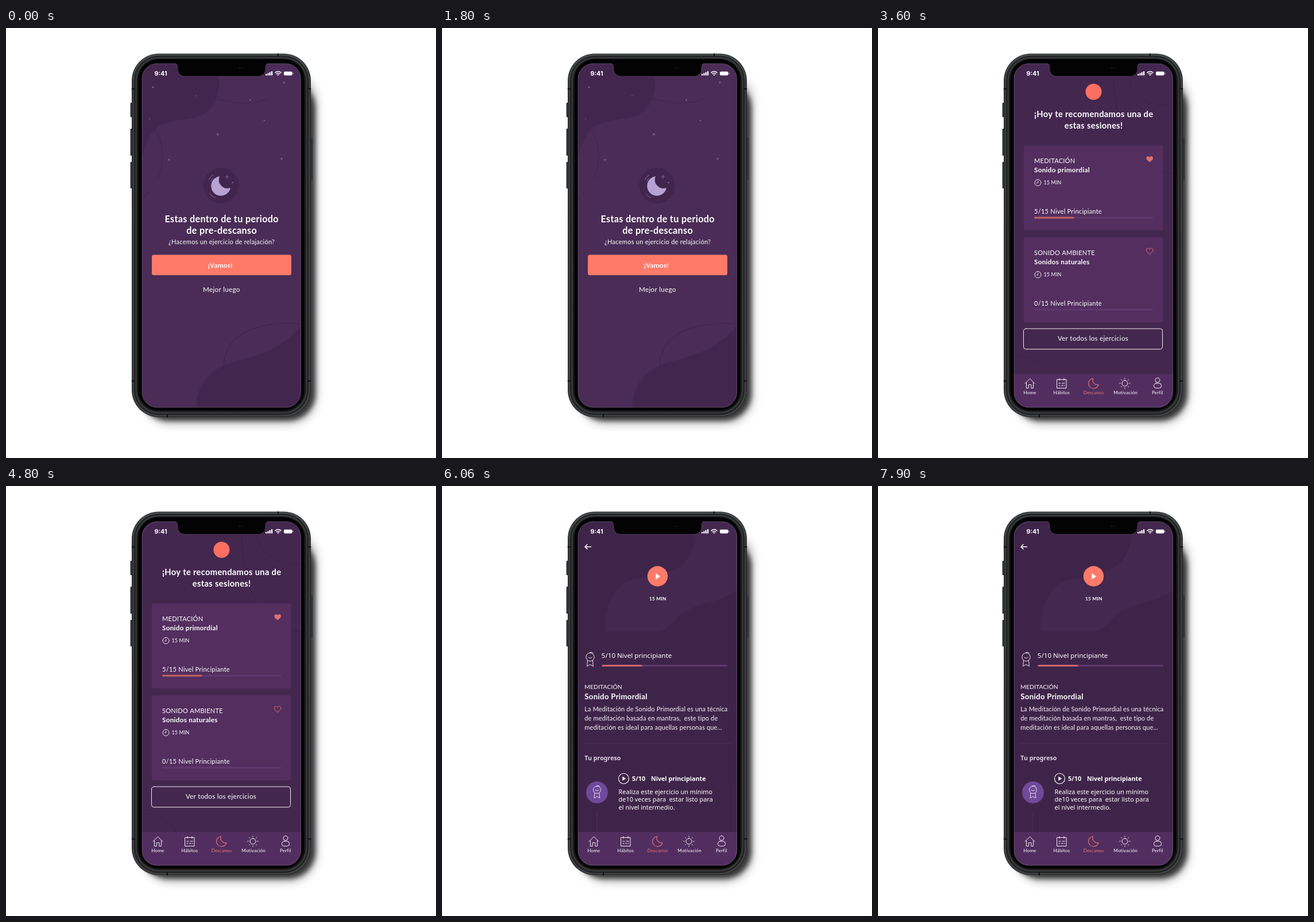
These frames come from a looping animation (749x748 px, 8 s). An HTML page with a canvas:

```html
<!DOCTYPE html>
<html lang="es">
<head>
<meta charset="utf-8">
<title>Descanso</title>
<style>
html, body { margin: 0; width: 100%; height: 100%; overflow: hidden; background: #fff; }
canvas { display: block; width: 749px; height: 748px; }
</style>
</head>
<body>
<canvas id="stage"></canvas>
<script>
const W = 749, H = 748, LOOP = 8000;
const SCREEN = { x: 237, y: 62, w: 276.5, h: 598 };
const CORAL = '#ff7a69';
const dpr = window.devicePixelRatio || 1;
let c;

function layer(draw, canvas = document.createElement('canvas')) {
  canvas.width = W * dpr;
  canvas.height = H * dpr;
  c = canvas.getContext('2d');
  c.scale(dpr, dpr);
  c.lineCap = c.lineJoin = 'round';
  draw();
  return canvas;
}

function fill(d, color) {
  c.fillStyle = color;
  c.fill(new Path2D(d));
}

function line(d, color, width = 1) {
  c.strokeStyle = color;
  c.lineWidth = width;
  c.stroke(new Path2D(d));
}

function box(x, y, w, h, r, color, stroke = 0) {
  c.beginPath();
  c.roundRect(x, y, w, h, r);
  if (stroke) {
    c.strokeStyle = color;
    c.lineWidth = stroke;
    c.stroke();
  } else {
    c.fillStyle = color;
    c.fill();
  }
}

function disc(x, y, r, color, stroke = 0) {
  box(x - r, y - r, 2 * r, 2 * r, r, color, stroke);
}

function text(s, x, y, size, { bold, center, color = '#fff', font = 'Lato', track = 0.02 } = {}) {
  c.font = `${bold ? 'bold ' : ''}${size}px ${font}, sans-serif`;
  c.letterSpacing = size * track + 'px';
  c.textAlign = center ? 'center' : 'left';
  c.fillStyle = color;
  c.fillText(s, x, y);
}

const noto = { font: '"Noto Sans"', track: 0 };
const mid = { center: true };
const midBold = { center: true, bold: true };

// Phone

function shadow(x, y, w, h, blur, alpha) {
  c.save();
  c.filter = `blur(${blur * dpr}px)`;
  box(x, y, w, h, 48, `rgba(0,0,0,${alpha})`);
  c.restore();
}

function phone() {
  shadow(238, 80, 303, 608, 8, 0.3);
  shadow(234, 92, 305, 591, 4.5, 0.7);

  for (const [y, h] of [[130, 25], [175, 47], [233, 46]]) {
    box(216.5, y, 5, h, 1.5, '#25282a');
    line(`M217.6 ${y + 2}v${h - 4}`, '#4a4e50', 0.8);
  }
  box(528, 190, 6, 74, 1.5, '#303235');

  const rim = c.createLinearGradient(0, 44, 0, 678);
  rim.addColorStop(0, '#3a4241');
  rim.addColorStop(0.1, '#292a2b');
  rim.addColorStop(1, '#303133');
  box(219, 44.5, 312, 632.5, 47, rim);
  box(221.8, 47.2, 306.4, 627, 44.5, '#4e5052', 1.2);
  box(224, 49.5, 302, 622.5, 42.5, '#232425', 2.4);
  box(226.8, 51.6, 296.4, 617.5, 40, '#3a3b3d', 1.4);
  box(228.2, 53, 293.6, 614.5, 38, '#141415');
  box(231, 54.5, 288, 610.5, 35, '#020202');

  for (const x of [219.5, 526.5]) {
    line(`M${x} 106h4M${x} 614h4`, '#0d0e0f', 2);
  }
  line('M474 45v4M281 672.5v4', '#0e0f10', 2);
}

function notch() {
  box(SCREEN.x, SCREEN.y, SCREEN.w, SCREEN.h, 26, 'rgba(165,152,176,.45)', 0.8);
  fill('M293 61Q299 62 299 68V71C299 79 304 84 312 84H439C447 84 452 79 452 71V68Q452 62 458 61Z', '#030303');
  line('M294 62.2Q299 63 299 68V71C299 79 304 84 312 84H439C447 84 452 79 452 71V68Q452 63 457 62.2', 'rgba(160,145,172,.4)', 0.7);
  disc(406.5, 70, 0.9, '#26262a');
  disc(410.5, 70, 0.9, '#26262a');
}

function statusBar() {
  text('9:41', 258.5, 83, 10.8, { bold: true, font: 'Inter', track: 0 });
  for (let i = 0; i < 4; i++) box(452 + i * 3.3, 80 - i * 1.6, 2.3, 2.6 + i * 1.6, 0.6, '#fff');
  line('M469 77.6Q474 73.3 479 77.6', '#fff', 1.5);
  line('M471 79.8Q474 77.4 477 79.8', '#fff', 1.4);
  fill('M472.2 81.2Q474 79.9 475.8 81.2L474 83Z', '#fff');
  box(484, 75.8, 14.5, 6.6, 1.8, '#fff');
  box(499.4, 77.8, 1.1, 2.6, 0.5, 'rgba(255,255,255,.6)');
}

function screen(bg, draw) {
  return layer(() => {
    c.beginPath();
    c.roundRect(SCREEN.x, SCREEN.y, SCREEN.w, SCREEN.h, 26);
    c.clip();
    c.fillStyle = bg;
    c.fillRect(0, 0, W, H);
    draw();
    statusBar();
  });
}

// Icons

function heart(x, y, solid) {
  const d = `M${x} ${y + 5.3}C${x - 3} ${y + 3} ${x - 6} ${y + 1} ${x - 5.8} ${y - 2}` +
    `C${x - 5.5} ${y - 5.5} ${x - 1} ${y - 6} ${x} ${y - 2.8}` +
    `C${x + 1} ${y - 6} ${x + 5.5} ${y - 5.5} ${x + 5.8} ${y - 2}` +
    `C${x + 6} ${y + 1} ${x + 3} ${y + 3} ${x} ${y + 5.3}Z`;
  solid ? fill(d, '#dc716f') : line(d, '#dc716f', 1);
}

function clock(x, y) {
  disc(x, y, 5.5, '#fff', 0.9);
  line(`M${x + 0.3} ${y - 3}V${y + 0.5}H${x - 2.2}`, '#fff', 0.8);
}

function badge(x, y, k) {
  c.save();
  c.translate(x, y);
  c.scale(k, k);
  disc(0, 0, 7.2, '#fff', 0.9);
  line('M-3.2 0.5Q0 3.5 3.2 0.5M-1-7Q3-10 5-6.5M-4.5 6.2L-5.3 16L0 13L5.3 16L4.5 6.2', '#fff', 0.9);
  c.restore();
}

function tabBar() {
  box(237, 602, 277, 60, 0, '#522e60');
  const ink = '#f4eef7';
  line('M256 618.5L264.5 610L273 618.5M258.5 617V626.5H262.2V620.5H266.8V626.5H270.5V617', ink);
  line('M312 611.5H328V626.5H312ZM316 609.5V613M324 609.5V613', ink);
  line('M315 618H318M321 618H325M315 622H317M319.5 622H322M324 622H325', ink, 1.2);
  line('M374.5 609.5A8.8 8.8 0 1 0 384 620.5A8.2 8.2 0 0 1 374.5 609.5Z', '#ef7770', 1.1);
  disc(430, 618, 5, ink, 1);
  for (let i = 0; i < 8; i++) {
    const a = i * Math.PI / 4, u = Math.cos(a), v = Math.sin(a);
    line(`M${430 + 7.7 * u} ${618 + 7.7 * v}L${430 + 9.2 * u} ${618 + 9.2 * v}`, ink);
  }
  disc(487, 612.5, 4, ink, 1);
  box(480.5, 618, 13, 8.5, 4, ink, 1);
  ['Home', 'Hábitos', 'Descanso', 'Motivación', 'Perfil'].forEach((label, i) =>
    text(label, 264.3 + i * 55.6, 637, 8.12, { center: true, color: i === 2 ? '#ef7770' : '#fff' }));
}

function progress(x, y, w, done, track, color = '#c4625f') {
  box(x, y, w, 3, 1.5, track);
  if (done) box(x, y, done, 3, 1.5, color);
}

// Screens

function invite() {
  fill('M237 62H371V84C374 116 361 146 332 155C303 162 273 160 256 180C244 195 240 213 237 228Z', '#43264e');
  fill('M331 661C332 627 349 598 386 584C430 571 478 563 514 517V661Z', '#43264e');
  const faint = '#40244b';
  line('M362 122C395 131 430 135 454 124', faint);
  line('M256 174C277 195 278 238 263 265M250 284Q244 292 237 297', faint);
  line('M379 589C380 545 415 510 510 514.5', faint, 1.2);

  for (const [x, y, r] of [[256, 103, 1.7], [331, 118, 0.9], [425.5, 125, 1.6], [450, 161, 1.3],
    [250, 158, 1], [369, 185, 2], [284, 229, 1.7], [480, 227.5, 1.7], [484, 95, 1.7]]) {
    disc(x, y, r, '#77598a');
  }

  disc(374.5, 274, 31, '#41254d');
  fill('M372 258A17 17 0 1 0 391 278A15 15 0 0 1 372 258Z', '#b8a2d2');
  line('M353.5 264Q356 258.5 361 255.5M356.5 267Q358 264 360 262M355 288Q358.5 293 364 295', '#6f5385', 1.3);
  line('M385 256V262M382 259H388', '#80649a', 1.1);
  disc(394.5, 269, 1.2, '#80649a');

  text('Estas dentro de tu periodo', 375.7, 337.5, 16.2, midBold);
  text('de pre-descanso', 375.7, 358.3, 16.2, midBold);
  text('¿Hacemos un ejercicio de relajación?', 375.7, 376, 11.1, mid);
  box(254, 394.5, 243, 35.5, 3.5, CORAL);
  text('¡Vamos!', 373.3, 417, 11.8, midBold);
  text('Mejor luego', 375.3, 458.5, 11.8, mid);
}

function card(y, kind, name, done, liked) {
  box(254, y, 242.5, 148, 3, '#532e5f');
  text(kind, 272, y + 30.5, 11.1);
  text(name, 272, y + 46.7, 11.8, { bold: true });
  clock(278.5, y + 65);
  text('15 MIN', 288.5, y + 68.2, 8.85);
  text(`${done}/15 Nivel Principiante`, 272, y + 118.5, 11.1);
  progress(272, y + 124.5, 207, done * 13.9, '#633871');
  heart(473.2, y + 24, liked);
}

function sessions() {
  const faint = '#3c2147';
  line('M411 85C412 165 440 253 514 253', faint);
  line('M437 85C441 120 475 136 514 135', faint);
  line('M239 571C268 569 287 582 295 602', faint);
  disc(375.5, 111, 14, '#ff6f61');
  text('¡Hoy te recomendamos una de', 375.7, 154.5, 14.76, midBold);
  text('estas sesiones!', 375.7, 175, 14.76, midBold);
  card(204, 'MEDITACIÓN', 'Sonido primordial', 5, true);
  card(364, 'SONIDO AMBIENTE', 'Sonidos naturales', 0, false);
  box(253.5, 523, 242, 35.7, 4, '#f3edf5', 1);
  text('Ver todos los ejercicios', 374.5, 543.5, 11.7, mid);
  tabBar();
}

function detail() {
  fill('M283 253C283 214 296 171 336 162C386 154 438 150 441 84V62H514V181C480 205 442 202 415 224C400 240 390 252 373 253Z', '#44284f');
  line('M253 101.8L249 105.7L253 109.6M249.3 105.7H259.5', '#fff', 1.5);
  disc(375.5, 157, 17.7, CORAL);
  fill('M373 153L379.3 157.3L373 161.6Z', '#fff');
  line('M373 153L379.3 157.3L373 161.6Z', '#fff', 1.2);
  text('15 MIN', 375.8, 198.5, 8.4, midBold);

  badge(258, 297.5, 1);
  text('5/10 Nivel principiante', 277.8, 299, 11.6, noto);
  progress(278.5, 311, 218.5, 70, '#5d3970', '#cf686c');

  text('MEDITACIÓN', 248.3, 352.7, 10.33, { track: 0.01 });
  text('Sonido Primordial', 248.3, 371, 13.28, { bold: true });
  ['La Meditación de Sonido Primordial es una técnica',
    'de meditación basada en mantras,  este tipo de',
    'meditación es ideal para aquellas personas que...'
  ].forEach((s, i) => text(s, 248.3, 391.5 + i * 16.4, 11.07, { color: '#f8f4fa', track: 0.01 }));
  line('M248 447.5H503', '#4d305a', 0.8);

  text('Tu progreso', 248.3, 476.5, 10.7, { ...noto, bold: true, color: '#ddd3e4' });
  disc(316.5, 509, 9, '#fff', 1.1);
  fill('M314.3 505.3L320.3 509L314.3 512.7Z', '#fff');
  text('5/10', 331, 512.5, 10.9, { ...noto, bold: true });
  text('Nivel principiante', 364, 512.5, 10.7, { ...noto, bold: true });
  disc(270, 533, 19, '#70499a');
  badge(270, 528.5, 0.9);
  line('M269.5 567V602', '#51345f', 0.8);
  ['Realiza este ejercicio un mínimo', 'de10 veces para  estar listo para', 'el nivel intermedio.']
    .forEach((s, i) => text(s, 307.6, 536 + i * 13.4, 10.9, noto));
  tabBar();
}

// Playback

const body = layer(phone);
const screens = [screen('#4a2c56', invite), screen('#44274f', sessions), screen('#3f244a', detail)];
const overlay = layer(notch);
const stage = document.getElementById('stage');
layer(() => {}, stage);
const out = c;

const dissolves = [{ at: 2670, length: 330 }, { at: 5540, length: 300 }];
const easeOut = p => 1 - (1 - p) ** 2;

function put(image, alpha = 1) {
  out.globalAlpha = alpha;
  out.drawImage(image, 0, 0, W, H);
}

function frame(now) {
  const t = now % LOOP;
  out.globalAlpha = 1;
  out.fillStyle = '#fff';
  out.fillRect(0, 0, W, H);
  put(body);
  put(screens[0]);
  dissolves.forEach(({ at, length }, i) => {
    const p = Math.min(1, Math.max(0, (t - at) / length));
    if (p > 0) put(screens[i + 1], easeOut(p));
  });
  put(overlay);
  requestAnimationFrame(tick);
}

const start = performance.now();
function tick() {
  frame(performance.now() - start);
}
tick();
</script>
</body>
</html>
```
